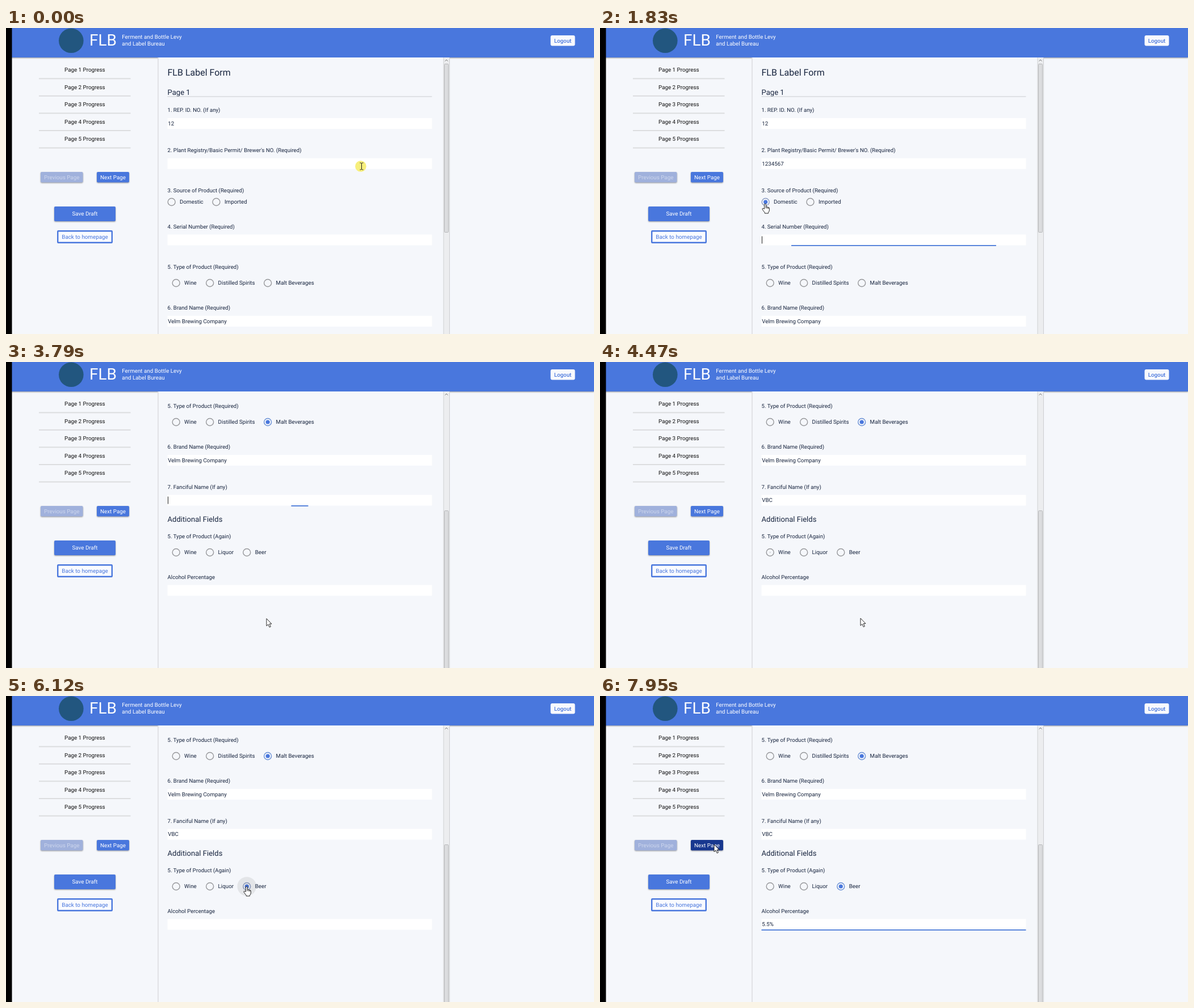
These frames come from a looping animation (1036x540 px, 8000 ms). An HTML page:

```html
<!DOCTYPE html>
<html lang="en">
<head>
<meta charset="utf-8">
<title>Label form</title>
<style>
  html, body { margin: 0; width: 100%; height: 100%; overflow: hidden; background: #f5f7fb; }
  svg { display: block; width: 100vw; height: 100vh; }
  text { font: 9.8px Roboto, sans-serif; fill: #18253f; text-rendering: geometricPrecision; white-space: pre; }
  .label { font-size: 9.66px; }
  .mid { text-anchor: middle; }
  .raised { filter: drop-shadow(0 1px 1.3px #0006); }
</style>
</head>
<body>
<svg id="stage" viewBox="0 0 1036 540" preserveAspectRatio="none"></svg>
<script>
const LOOP = 8000, SCROLL = 344;
const BLUE = '#4977dd', PAGE = '#f5f7fb';
const RING = { idle: '#98999c', picked: '#8f9fc4', settled: '#6c92d6' };
const stage = document.getElementById('stage');

// Form content, in unscrolled coordinates; y is the vertical centre.
const fields = {
  rep:      { y: 168.5, text: '12' },
  permit:   { y: 239.3, text: '1234567', focus: [60, 890], keys: [150, 600] },
  serial:   { y: 374, text: '567777', focus: [1714, 2930], keys: [1950, 2420] },
  brand:    { y: 517.4, text: 'Velm Brewing Company' },
  fanciful: { y: 588, text: 'VBC', focus: [3783, 4430], keys: [4000, 4290] },
  alcohol:  { y: 747, text: '5.5%', focus: [6480, LOOP], keys: [6620, 6950] }
};
// pick: time it is chosen; settle: time its ring turns blue;
// ripple: [grow from, grow to, fade from, fade to, opacity]
const radios = {
  domestic:  { x: 291.7, y: 307, label: 'Domestic', pick: 930, settle: 1850, ripple: [900, 1020, 1080, 1230, .1] },
  imported:  { x: 370.5, y: 307, label: 'Imported' },
  wine:      { x: 299.7, y: 450, label: 'Wine' },
  spirits:   { x: 359.2, y: 450, label: 'Distilled Spirits' },
  malt:      { x: 461.2, y: 450, label: 'Malt Beverages', pick: 2980, settle: 3560, ripple: [2950, 3060, 3450, 3550, .08] },
  wineAgain: { x: 299.7, y: 680, label: 'Wine', ripple: [4460, 4620, 5650, 5900, .15] },
  liquor:    { x: 359.2, y: 680, label: 'Liquor' },
  beer:      { x: 424.3, y: 680, label: 'Beer', pick: 5800, settle: 6500, ripple: [5780, 5900, 6080, 6250, .1] }
};
const labels = [
  [145, '1. REP. ID. NO. (If any)'],
  [215.7, "2. Plant Registry/Basic Permit/ Brewer's NO. (Required)"],
  [286.5, '3. Source of Product (Required)'],
  [351, '4. Serial Number (Required)'],
  [421.5, '5. Type of Product (Required)'],
  [493.7, '6. Brand Name (Required)'],
  [564.5, '7. Fanciful Name (If any)'],
  [651.5, '5. Type of Product (Again)'],
  [724, 'Alcohol Percentage']
];

// Pointer way points: time, x, y, shape from then on.
const path = [
  [0, 626.5, 244, 'beam'], [500, 626.5, 244, 'beam'], [580, 560, 258, 'arrow'],
  [720, 370, 300, 'arrow'], [780, 310, 308, 'hand'], [840, 291, 310, 'hand'],
  [2500, 291, 310, 'hand'], [2560, 312, 345, 'arrow'], [2720, 425, 478, 'arrow'],
  [2800, 448, 470, 'arrow'], [2880, 459, 453, 'hand'], [3480, 459, 453, 'arrow'],
  [4740, 459, 452, 'arrow'], [4900, 470, 418, 'arrow'], [5050, 460, 380, 'arrow'],
  [5220, 434, 354, 'arrow'], [5400, 429, 349, 'arrow'], [5550, 424, 344, 'arrow'],
  [5680, 424, 336, 'hand'], [6200, 424, 336, 'hand'], [6260, 424, 350, 'arrow'],
  [6370, 425, 400, 'beam'], [6450, 425.5, 405, 'beam'], [7100, 425.5, 405, 'beam'],
  [7230, 339, 403, 'beam'], [7300, 310, 378, 'arrow'], [7520, 235, 290, 'arrow'],
  [7720, 206, 245, 'arrow'], [7950, 201, 262, 'arrow'], [8000, 201, 262, 'arrow']
];
const clicks = [0, 900, 2920, 5790, 6450];

const text = (x, y, s, attrs = '') => `<text x="${x}" y="${y + 3.4}" ${attrs}>${s}</text>`;
const box = (x, y, w, h, fill, attrs = '') =>
  `<rect x="${x}" y="${y}" width="${w}" height="${h}" fill="${fill}" ${attrs}/>`;
const button = (x, y, w, h, fill, label, ink = '#fff', attrs = 'rx="2" class="raised"', type = '') =>
  box(x, y, w, h, fill, attrs) +
  text(x + w / 2, y + h / 2, label, `class="mid" style="fill:${ink};${type}"`);

const fieldMarkup = ([id, f]) => box(284.5, f.y - 9.5, 466, 19, '#fff') +
  text(285.2, f.y, f.text, `id="${id}-text"`) +
  (f.focus ? box(284.5, f.y + 9, 466, 1.7, '#3f73d6', `id="${id}-line"`) +
    box(285, f.y - 6.5, 1, 13, '#222', `id="${id}-caret"`) : '');

const radioMarkup = ([id, r]) =>
  `<circle id="${id}-ring" cx="${r.x}" cy="${r.y}" r="6.5" fill="none" stroke="${RING.idle}" stroke-width="1.4"/>
   <circle id="${id}-dot" cx="${r.x}" cy="${r.y}" r="3.6" fill="${BLUE}" visibility="hidden"/>
   <circle id="${id}-ripple" cx="${r.x}" cy="${r.y}" r="0"/>` +
  text(r.x + 14.4, r.y, r.label);

const sidebar = [1, 2, 3, 4, 5].map(n => {
  const y = 43 + n * 30.55;
  return text(138.8, y, `Page ${n} Progress`, 'class="mid" style="fill:#111"') +
    box(58, y + 14.8, 161.5, 2, '#dcdddf');
}).join('');

stage.innerHTML = `
  <clipPath id="view">${box(269, 52, 502, 488, '#fff')}</clipPath>
  ${box(0, 0, 1036, 540, PAGE)}
  ${sidebar}
  ${button(61, 254, 74.5, 18.5, '#a0b1dc', 'Previous Page', '#cdd6ed')}
  ${button(160, 254, 57, 18.5, BLUE, 'Next Page', '#fff', 'id="next" rx="2" class="raised"')}
  ${button(85, 315, 108, 26, BLUE, 'Save Draft')}
  ${button(91.2, 358.2, 95.6, 20.6, '#f8faff', 'Back to homepage', BLUE, `rx="1" stroke="${BLUE}" stroke-width="2.4"`)}
  ${box(0, 0, 1036, 52, BLUE, 'style="filter:drop-shadow(0 1px 1.3px #0006)"')}
  ${box(267.5, 52, 514.5, 488, PAGE)}
  ${box(267.5, 52, 1, 488, '#cdced1')}
  <g clip-path="url(#view)"><g id="form">
    ${text(284.5, 80.7, 'FLB Label Form', 'style="font-size:16px"')}
    ${text(284.5, 114.2, 'Page 1', 'style="font-size:13.1px"')}
    ${box(284.5, 120.5, 466, 1, '#c9cbd0')}
    ${text(284.5, 622.7, 'Additional Fields', 'style="font-size:13.1px"')}
    ${labels.map(([y, s]) => text(284.5, y, s, 'class="label"')).join('')}
    ${Object.entries(fields).map(fieldMarkup).join('')}
    ${Object.entries(radios).map(radioMarkup).join('')}
  </g></g>
  ${box(770.5, 52, 11, 488, '#ecedef')}
  ${box(770.5, 52, 1, 488, '#d2d3d5')}
  ${box(781, 52, 1, 488, '#cdced1')}
  <path d="M773.5 58.5l2.5-2.5 2.5 2.5" fill="none" stroke="#777"/>
  ${box(772.5, 63.5, 7, 297, '#dcdddf', 'id="thumb" rx="1" stroke="#b5b6b8"')}
  <circle cx="114.8" cy="22.3" r="21.8" fill="#22567f"/>
  ${text(147, 27.5, 'FLB', 'style="font-size:28px;fill:#fff"')}
  ${text(204.3, 16, 'Ferment and Bottle Levy', 'style="fill:#fff"')}
  ${text(204.3, 27.5, 'and Label Bureau', 'style="fill:#fff"')}
  ${button(959.5, 13, 43, 18.5, '#f8f9fd', 'Logout', BLUE, 'rx="3"', 'font-weight:500')}
  ${box(0, 0, 10.5, 540, '#000')}
  <g id="pointer">
    <circle id="halo" cx="-1.5" r="9.8" fill="#f7ef7c"/>
    <path id="beam" d="M-3-6H-1L0-5 1-6H3M0-5V5M-3 6H-1L0 5 1 6H3" fill="none" stroke="#222"/>
    <path id="arrow" d="M0 0V13L3 10.3 5.2 15.3 7.4 14.3 5.2 9.4H9Z" fill="#fff" stroke="#111" stroke-width=".9"/>
    <path id="hand" transform="scale(.92)" d="M-1.5 10V1Q0-.8 1.5 1V6Q3 5 4 6.6 5.5 5.8 6.3 7.4 8 7 8 9V13Q7.5 15.5 6 17V18.5H-.8V17Q-3.5 14-5.5 10.5-5.4 8.3-3.3 9.3ZM1.5 6V9M4 6.6V9.4M6.3 7.4V9.8" fill="#fff" stroke="#111"/>
  </g>`;

const el = id => document.getElementById(id);
const set = (id, attrs) => { for (const k in attrs) el(id).setAttribute(k, attrs[k]); };
const show = (id, on) => set(id, { visibility: on ? 'visible' : 'hidden' });
const progress = (t, from, to) => Math.min(1, Math.max(0, (t - from) / (to - from)));

// cubic-bezier(.25, .8, .25, 1), solved by bisection
function swift(x) {
  let lo = 0, hi = 1, s = .5;
  for (let i = 0; i < 20; i++) {
    s = (lo + hi) / 2;
    if (.75 * s * (1 - s) + s ** 3 < x) lo = s; else hi = s;
  }
  return 2.4 * s * (1 - s) ** 2 + 3 * s * s * (1 - s) + s ** 3;
}

function drawField(id, f, t) {
  if (!f.focus) return;
  const [start, end] = f.focus, [first, last] = f.keys;
  const gap = (last - first) / (f.text.length - 1);
  const typed = t < first ? 0 : Math.min(f.text.length, Math.floor((t - first) / gap + 1e-6) + 1);
  const label = el(id + '-text');
  label.textContent = f.text.slice(0, typed);

  const focused = t >= start && t < end;
  const lastKey = typed ? first + (typed - 1) * gap : start;
  show(id + '-line', focused);
  show(id + '-caret', focused && (t - lastKey) % 1060 < 530);
  if (!focused) return;
  const width = 466 * swift(progress(t, start, start + 400));
  set(id + '-line', { x: 517.5 - width / 2, width });
  set(id + '-caret', { x: 285 + (typed ? label.getComputedTextLength() : 0) });
}

function drawRadio(id, r, t) {
  if (r.pick) {
    show(id + '-dot', t >= r.pick);
    set(id + '-ring', { stroke: t >= r.settle ? RING.settled : t >= r.pick ? RING.picked : RING.idle });
  }
  if (r.ripple) {
    const [from, full, fade, gone, alpha] = r.ripple;
    set(id + '-ripple', {
      r: 16.8 * progress(t, from, full),
      'fill-opacity': alpha * (1 - progress(t, fade, gone))
    });
  }
}

function drawPointer(t) {
  const i = Math.max(1, path.findIndex(p => p[0] > t));
  const [t0, x0, y0, shape] = path[i - 1], [t1, x1, y1] = path[i];
  const k = progress(t, t0, t1);
  set('pointer', { transform: `translate(${x0 + (x1 - x0) * k} ${y0 + (y1 - y0) * k})` });
  for (const s of ['beam', 'arrow', 'hand']) show(s, s === shape);
  show('halo', clicks.some(c => t >= c && t < c + 110));
}

function draw(t) {
  const scrolled = 1 - (1 - progress(t, 3450, 3720)) ** 2;
  set('form', { transform: `translate(0 ${-SCROLL * scrolled})` });
  set('thumb', { y: 63.5 + 199 * scrolled });
  for (const id in fields) drawField(id, fields[id], t);
  for (const id in radios) drawRadio(id, radios[id], t);
  set('next', { fill: t >= 7800 ? '#18388f' : BLUE });
  drawPointer(t);
}

const began = performance.now();
function tick() {
  draw((performance.now() - began) % LOOP);
  requestAnimationFrame(tick);
}
tick();
</script>
</body>
</html>
```
